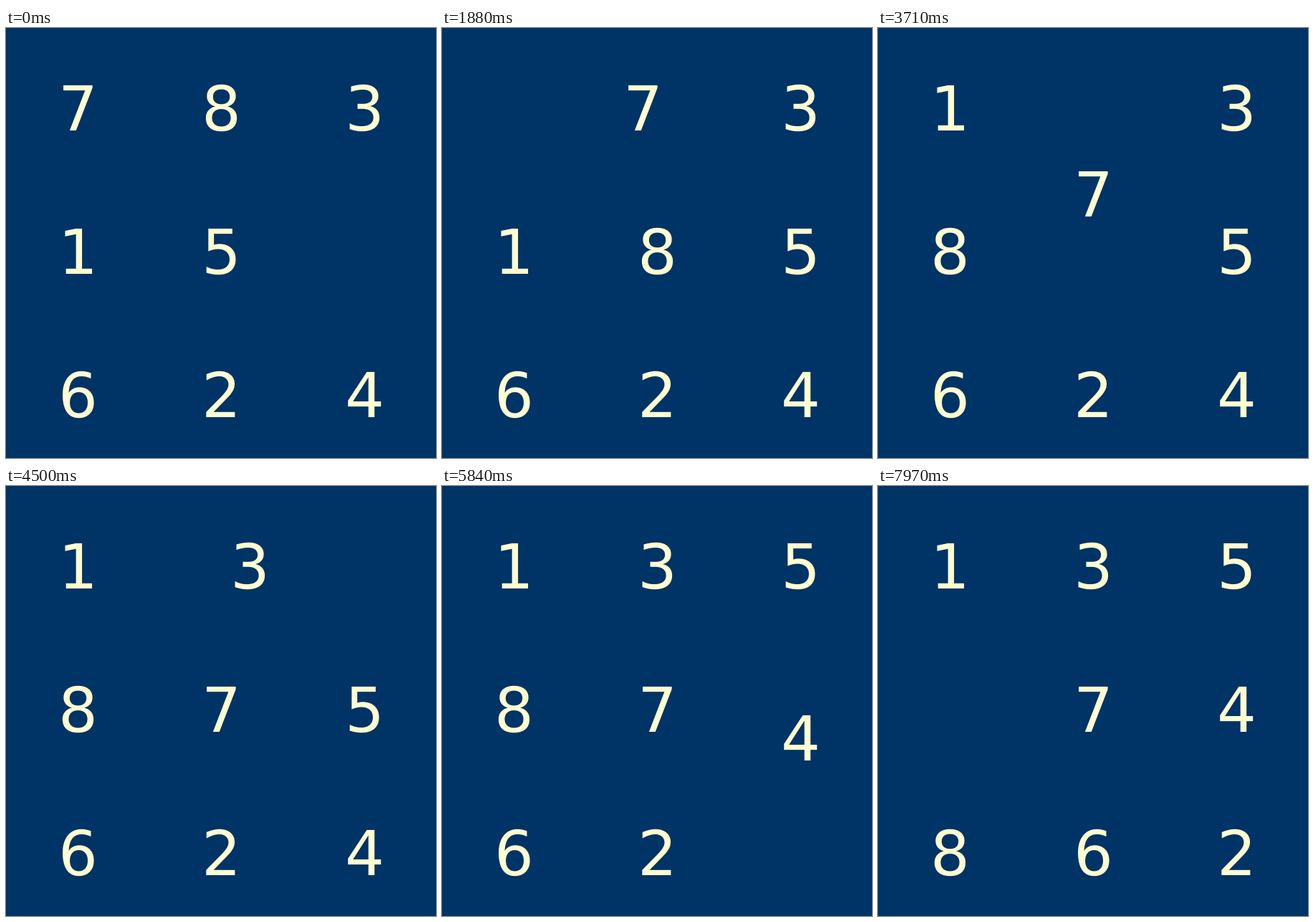
An HTML page that plays this animation: 600 by 600 pixels, repeating every 8 s.

```html
<!DOCTYPE html>
<html lang="en">
<head>
<meta charset="utf-8">
<title>Sliding numbers</title>
<style>
  html, body { margin: 0; width: 100%; height: 100%; overflow: hidden; background: #003366; }
  svg { display: block; width: 100%; height: 100%; }
  text {
    font: 86.5px "DejaVu Sans", sans-serif;
    text-anchor: middle;
    text-rendering: geometricPrecision;
    fill: #fffdd0;
  }
</style>
</head>
<body>
<svg viewBox="0 0 600 600"></svg>
<script>
const LOOP = 8000, MOVE = 670, STEP = 60, STEPS = 10;
const START = "78315 624";       // row by row, the space is the hole
const MOVES = "587187354268";    // each number slides into the hole

const svg = document.querySelector("svg");
const tiles = {};
for (const digit of START.replace(" ", "")) {
  const text = document.createElementNS("http://www.w3.org/2000/svg", "text");
  text.textContent = digit;
  svg.append(text);
  tiles[digit] = text;
}

// The board before each move, and after the last one.
const boards = [[...START]];
for (const digit of MOVES) {
  const swap = { [digit]: " ", " ": digit };
  boards.push(boards.at(-1).map(c => swap[c] ?? c));
}

const cell = index => ({ x: index % 3 * 200 + 100, y: Math.floor(index / 3) * 200 + 100 });

function draw(time) {
  const move = Math.floor(time / MOVE);
  const progress = Math.min(STEPS, Math.floor(time % MOVE / STEP)) / STEPS;
  for (const digit in tiles) {
    const from = cell(boards[move].indexOf(digit));
    const to = cell(boards[move + 1].indexOf(digit));
    tiles[digit].setAttribute("x", from.x + (to.x - from.x) * progress + 0.5);
    tiles[digit].setAttribute("y", from.y + (to.y - from.y) * progress + 42.7);
  }
}

const begin = performance.now();
function tick() {
  draw((performance.now() - begin) % LOOP);
  requestAnimationFrame(tick);
}
tick();
</script>
</body>
</html>
```
